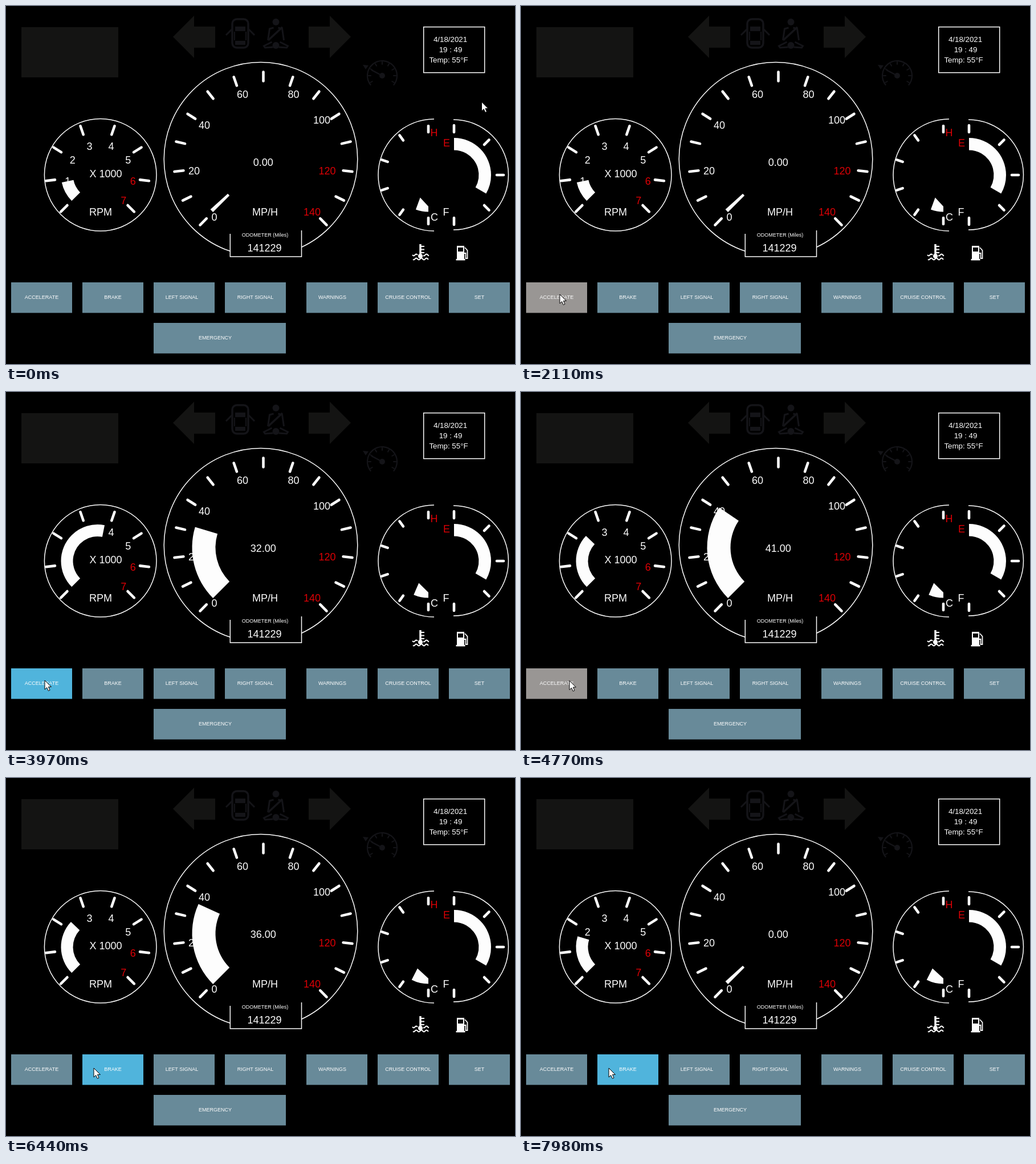
An HTML page with a canvas that plays this animation: 893 by 627 pixels, repeating every 8000 ms.

```html
<!DOCTYPE html>
<html lang="en">
<head>
<meta charset="utf-8">
<title>Dashboard</title>
<style>
html, body { margin: 0; width: 100%; height: 100%; overflow: hidden; background: #000; }
canvas { display: block; }
</style>
</head>
<body>
<canvas id="stage" width="893" height="627"></canvas>
<script>
const ctx = document.getElementById('stage').getContext('2d');
const LOOP = 8000;
const WHITE = '#fdfdfd', RED = '#dc0005', DIM = '#141413', LAMP = '#141418';
const RAD = Math.PI / 180;

// Driving phases in seconds
const GO = 3, RELEASE = 4.3, BRAKE_DOWN = 5.3, STOPPING = 7.28;

const clamp = (v, lo, hi) => Math.min(hi, Math.max(lo, v));
const between = (t, a, b) => clamp(t, a, b) - a;

function speedAt(t) {
  const v = 33 * between(t, GO, RELEASE) - 3 * between(t, RELEASE, STOPPING)
    - 58 * between(t, STOPPING, LOOP);
  return Math.floor(Math.max(0, v));
}

function rpmAt(t) {
  if (t < RELEASE) return 0.86 + 3.02 * between(t, GO, RELEASE);
  return 2.29 - 0.97 * between(t, STOPPING, LOOP);
}

function cursorAt(t) {
  const pos = { x: 834.5, y: 168 };
  const glide = (start, end, x, y) => {
    const p = between(t, start, end) / (end - start);
    const e = p * p * (3 - 2 * p);
    pos.x += (x - pos.x) * e;
    pos.y += (y - pos.y) * e;
  };
  glide(0.04, 0.84, 187, 508);
  glide(1.2, 1.75, 68, 505);
  glide(4.6, 5.2, 154, 508);
  return pos;
}

function text(str, x, y, size = 18, color = WHITE) {
  ctx.font = size + 'px "Liberation Sans", Arial, sans-serif';
  ctx.textAlign = 'center';
  ctx.fillStyle = color;
  ctx.fillText(str, x, y + size * 0.36);
}

function poly(points) {
  ctx.beginPath();
  for (let i = 0; i < points.length; i += 2) ctx.lineTo(points[i], points[i + 1]);
}

function stroke(points, width, color = WHITE) {
  poly(points);
  ctx.lineWidth = width;
  ctx.strokeStyle = color;
  ctx.stroke();
}

function fill(points, color = WHITE) {
  poly(points);
  ctx.fillStyle = color;
  ctx.fill();
}

function rect(x, y, w, h, color = WHITE) {
  ctx.fillStyle = color;
  ctx.fillRect(x, y, w, h);
}

function ring(x, y, r, from = 0, to = 360, width = 1.5, color = WHITE) {
  ctx.beginPath();
  ctx.arc(x, y, r, from * RAD, to * RAD);
  ctx.lineWidth = width;
  ctx.strokeStyle = color;
  ctx.stroke();
}

function disc(x, y, r, color = WHITE) {
  ctx.beginPath();
  ctx.arc(x, y, r, 0, 7);
  ctx.fillStyle = color;
  ctx.fill();
}

function band(x, y, inner, outer, from, sweep) {
  ctx.beginPath();
  ctx.arc(x, y, outer, from * RAD, (from + sweep) * RAD);
  ctx.arc(x, y, inner, (from + sweep) * RAD, from * RAD, true);
  ctx.fillStyle = WHITE;
  ctx.fill();
}

function polar(x, y, r, deg) {
  return [x + r * Math.cos(deg * RAD), y + r * Math.sin(deg * RAD)];
}

function ticks(x, y, r1, r2, start, step, count, width = 4.6, color = WHITE) {
  ctx.lineCap = 'round';
  for (let i = 0; i < count; i++) {
    const deg = start + i * step;
    stroke([...polar(x, y, r1, deg), ...polar(x, y, r2, deg)], width, color);
  }
  ctx.lineCap = 'butt';
}

// Draws once as given and once flipped about a vertical axis
function mirrored(axis, paint) {
  for (const side of [1, -1]) {
    ctx.save();
    ctx.translate(axis, 0);
    ctx.scale(side, 1);
    paint();
    ctx.restore();
  }
}

function dimLamps() {
  rect(27, 37, 170, 88, DIM);
  mirrored(449, () => {
    fill([156, 54, 119, 17, 119, 91], DIM);
    rect(82, 36, 38, 37, DIM);
  });

  // Open doors
  ctx.beginPath();
  ctx.roundRect(397, 23, 28, 50, 8);
  ctx.lineWidth = 3.5;
  ctx.strokeStyle = LAMP;
  ctx.stroke();
  rect(402, 36, 18, 8, LAMP);
  rect(402, 61, 18, 7, LAMP);
  mirrored(411, () => {
    stroke([10, 45, 10, 60], 2, LAMP);
    stroke([14, 40, 25, 51], 3, LAMP);
  });

  // Seat belt
  disc(473.5, 28, 6, LAMP);
  disc(473.5, 69, 6, LAMP);
  mirrored(473.5, () => {
    stroke([4, 38, 11, 40, 14, 60], 3, LAMP);
    stroke([7, 63, 21, 70, 19, 73, 5, 72], 3, LAMP);
  });
  stroke([485, 37, 460, 60], 3.5, LAMP);

  // Cruise control
  ring(660, 122, 26, 140, 400, 2.2, LAMP);
  ticks(660, 122, 20, 24, 150, 30, 9, 2, LAMP);
  stroke([660, 122, 641, 112], 2.5, LAMP);
  disc(660, 122, 5, LAMP);
  fill([626, 103, 636, 104, 631, 111], LAMP);
}

function infoBox() {
  ctx.strokeStyle = WHITE;
  ctx.lineWidth = 1.5;
  ctx.strokeRect(732.7, 36.7, 107, 80);
  text('4/18/2021', 779.5, 58, 13.3);
  text('19 : 49', 780, 76, 13.3);
  text('Temp: 55°F', 776.5, 94, 13.3);
}

function rpmGauge(rpm) {
  const x = 160.5, y = 296, step = 270 / 7;
  ring(165.7, 295.8, 98.3);
  ticks(x, y, 75, 91, 135, step, 8);
  for (let i = 1; i <= 7; i++) {
    text(i, ...polar(165.5, 300, 57.5, 135 + i * step), 18, i > 5 ? RED : WHITE);
  }
  text('X 1000', 175, 294);
  text('RPM', 166, 361);
  band(x, y, 43, 64, 135, rpm * step);
}

function speedGauge(speed) {
  const x = 451.5, y = 272.5;
  const spots = [[365.5, 370], [330, 289], [348, 209], [415, 155],
    [504.5, 155], [554, 200], [563.5, 289], [537, 361]];
  ring(447, 268.3, 169.8);
  rect(393, 394, 125, 46, '#000');
  stroke([393.3, 399, 393.3, 439, 518.5, 439, 518.5, 393], 1.5);
  ticks(x, y, 141, 157, 135, 270 / 14, 15);
  spots.forEach(([lx, ly], i) => text(i * 20, lx, ly, 18, i > 5 ? RED : WHITE));
  text('MP/H', 454.5, 361);
  text('ODOMETER (Miles)', 454.5, 401, 9);
  text('141229', 453.5, 424);
  text(speed.toFixed(2), 451.3, 274);
  band(x, y, 84, 125, 135, Math.max(3, speed * 270 / 140));
}

function tempGauge(sweep) {
  const x = 741, y = 296;
  ring(751, 296, 98, 90, 270);
  ticks(x, y, 75, 86, 90, 36, 6);
  text('H', 751, 222, 18, RED);
  text('C', 751.5, 370);
  ctx.beginPath();
  ctx.arc(x, y, 64.5, 90 * RAD, (90 + sweep) * RAD);
  ctx.lineTo(...polar(x, y, 42, 90 + sweep));
  ctx.lineTo(x, 351);
  ctx.fillStyle = WHITE;
  ctx.fill();

  // Thermometer in water
  stroke([727, 417, 727, 440], 3.5);
  disc(727, 438, 4);
  for (let i = 0; i < 3; i++) rect(728, 420 + i * 5.5, 6, 2);
  wave(713, 722, 436);
  wave(732, 742, 436);
  wave(714, 741, 443);
}

function wave(from, to, y) {
  ctx.beginPath();
  for (let x = from; x <= to; x++) ctx.lineTo(x, y + 1.5 * Math.sin((x - 713) * 0.7));
  ctx.lineWidth = 2;
  ctx.strokeStyle = WHITE;
  ctx.stroke();
}

function fuelGauge() {
  const x = 786, y = 296;
  ring(785, 295.5, 96.5, -90, 90);
  ticks(x, y, 75, 87, -90, 45, 5);
  text('E', 773, 240, 18, RED);
  text('F', 772, 361);
  band(x, y, 43.5, 65, -90, 120);

  // Fuel pump
  rect(791, 420, 13, 25);
  rect(789.5, 443, 16, 2.5);
  rect(793, 423, 9, 7, '#000');
  stroke([804, 433, 806.5, 433, 806.5, 442, 809.5, 442, 809.5, 428, 805, 423], 1.8);
}

function button(name, x, y, w, shift, pressed, mouse) {
  const hover = mouse.x >= x && mouse.x < x + w && mouse.y >= y && mouse.y < y + 54;
  rect(x, y, w, 53.5, name === pressed ? '#50b4dc' : hover ? '#999694' : '#688a99');
  text(name, x + w / 2 + shift, y + 26, 9);
}

function drawButtons(t, mouse) {
  const pressed = t >= GO && t < RELEASE ? 'ACCELERATE' : t >= BRAKE_DOWN ? 'BRAKE' : '';
  const names = ['ACCELERATE', 'BRAKE', 'LEFT SIGNAL', 'RIGHT SIGNAL',
    'WARNINGS', 'CRUISE CONTROL', 'SET'];
  const shifts = { 'LEFT SIGNAL': -4, WARNINGS: -8 };
  names.forEach((name, i) => {
    const x = 9 + 125 * i + (i > 3 ? 18 : 0);
    button(name, x, 484, 107, shifts[name] || 0, pressed, mouse);
  });
  button('EMERGENCY', 259, 555, 232, -8, pressed, mouse);
}

function drawCursor({ x, y }) {
  ctx.save();
  ctx.translate(x, y);
  poly([0, 0, 0, 16, 3.7, 12.6, 6.3, 18.4, 9, 17.2, 6.5, 11.5, 11.4, 11.4]);
  ctx.closePath();
  ctx.fillStyle = WHITE;
  ctx.fill();
  ctx.lineWidth = 1;
  ctx.strokeStyle = '#000';
  ctx.stroke();
  ctx.restore();
}

function draw(t) {
  rect(0, 0, 893, 627, '#000');
  const mouse = cursorAt(t);
  dimLamps();
  infoBox();
  rpmGauge(rpmAt(t));
  speedGauge(speedAt(t));
  tempGauge(20 + 3.5 * Math.floor(clamp(t / 3.2, 0, 2)));
  fuelGauge();
  drawButtons(t, mouse);
  drawCursor(mouse);
}

const begin = performance.now();
function frame() {
  draw((performance.now() - begin) % LOOP / 1000);
  requestAnimationFrame(frame);
}
frame();
</script>
</body>
</html>
```
